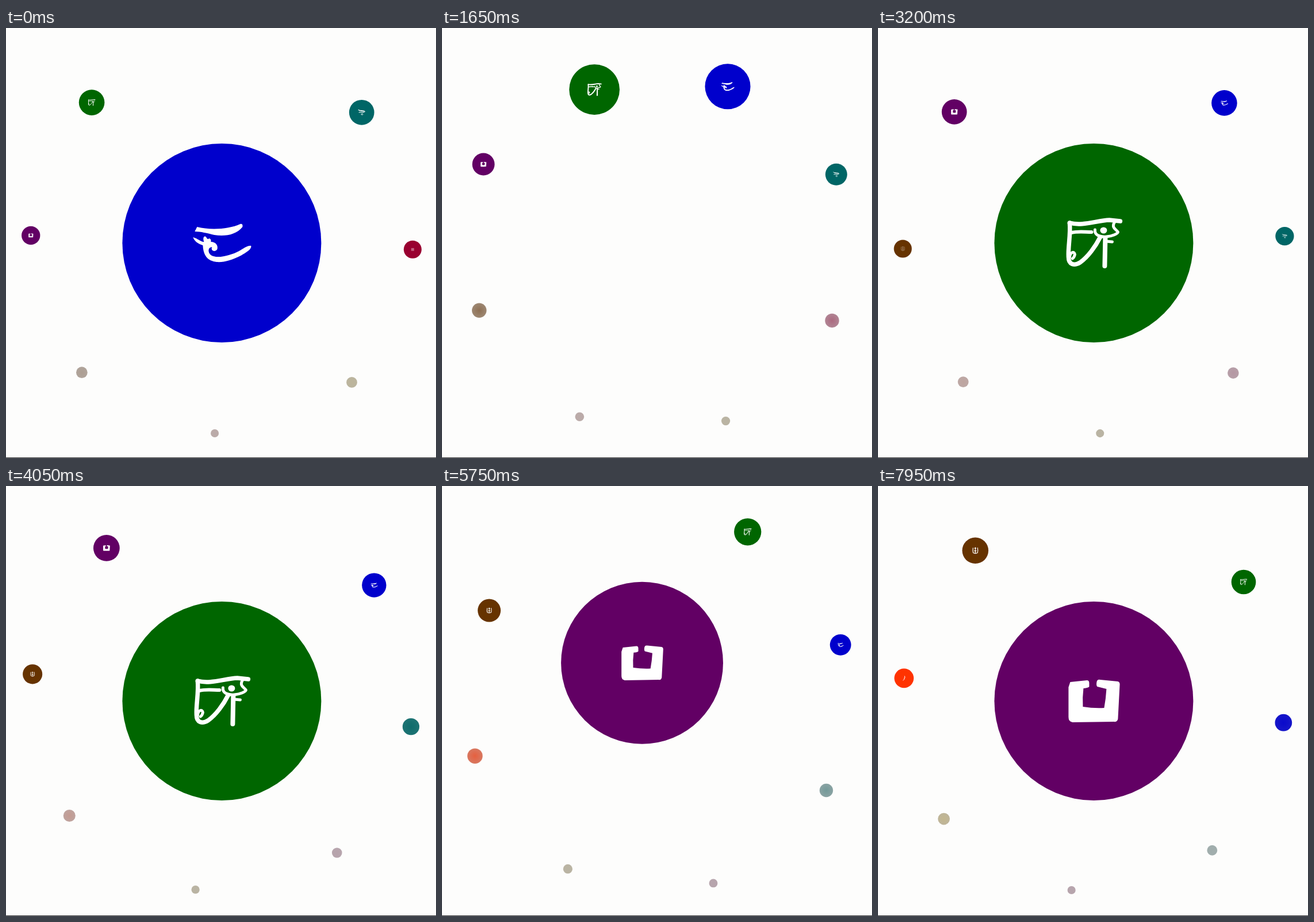
An HTML page with a canvas that plays this animation: 748 by 748 pixels, repeating every 8 s.

```html
<!DOCTYPE html>
<html lang="en">
<head>
<meta charset="utf-8">
<title>Glyph wheel</title>
<style>
  html, body { margin: 0; width: 100%; height: 100%; overflow: hidden; background: #fdfdfc; }
  canvas { display: block; }
</style>
</head>
<body>
<canvas id="stage" width="748" height="748"></canvas>
<script>
const ctx = document.getElementById('stage').getContext('2d');
const LOOP = 8000, STEP = 50;
const CENTER = { x: 375.3, y: 373 }, RING = 332.3;
const FOCUS = { x: 375.4, y: 374, r: 173 };
const FIRST_SWAP = 1527, SECOND_SWAP = 5267;
const ENTER_MS = 1000, LEAVE_MS = 200;

// Wheel rotation: [ms, degrees]
const TURN = [[0, 0], [1650, 22.05], [2400, 31.8], [4050, 50.8], [5150, 64.05], [6500, 79.65], [8000, 95.1]];
// Share of the faded colour: [y, amount]
const FADE = [[388, 0], [415, .11], [438, .26], [492, .62], [508, .72], [560, .88], [640, 1]];
const GLYPH_ALPHA = [[355, 1], [382, .45], [402, 0]];

// Glyph parts are [path, stroke width]; width 0 means filled. Drawn for a disc of radius 173 at (375, 374).
const GLYPHS = {
  reed: [
    ['M332 346C355 352 388 350 407 341Q412 340 411 346C400 360 380 363 362 360C350 357 338 354 328 354Z', 0],
    ['M325 364C333 366 340 373 344 372C341 364 345 360 348 364Q350 369 353 366Q357 367 356 372C365 372 369 379 367 385C363 391 355 387 358 381C351 381 350 390 356 395C366 402 390 396 405 388C414 383 420 378 426 379C427 385 418 390 408 396C392 404 378 408 366 407C350 405 343 396 342 378C335 376 327 371 325 364Z', 0]],
  eye: [
    ['M333 339C355 345 380 335 402 334L421 336', 7.5],
    ['M333 339C335 360 330 380 331 398C331 412 341 414 351 408C365 398 378 380 386 364', 7.5],
    ['M333 399C334 389 341 388 342 394Q341 399 338 401', 5],
    ['M336 356C348 353 360 355 371 355', 6],
    ['M377 351C376 361 387 364 397 363C408 362 416 358 417 355C414 350 405 348 411 338', 5],
    ['M386 352a6 5.5 0 1 0 12 0a6 5.5 0 1 0 -12 0Z', 0],
    ['M395 365L394 414', 8],
    ['M396 371L407 372', 5]],
  house: [
    ['M334 341L363 338Q367 338 367 343L367 349Q366 351 357 352Q355 368 356 384Q375 387 393 386Q396 370 397 353L381 349Q379 347 380 341Q381 336 386 337L417 340Q421 341 420 348L417 405Q416 411 410 410L376 410.5L338 411Q331 410 331 402L331 350Z', 0]],
  cart: [
    ['M330 338L350 352L420 362L398 374L338 374', 8],
    ['M345 345L410 352', 7],
    ['M371 400a10 10 0 1 0 20 0a10 10 0 1 0 -20 0Z', 6]],
  trident: [
    ['M345 340Q338 376 346 402Q375 420 405 402Q412 376 405 338', 9],
    ['M375 335L375 410M362 378L388 378M367 346L375 334L383 346', 9]],
  bolt: [['M386 338L392 366L372 376L386 386L358 412', 10]],
  block: [['M347 348H403V402H347Z', 0]]
};
for (const parts of Object.values(GLYPHS))
  for (const part of parts) part[0] = new Path2D(part[0]);

// angle is clockwise from the left; enter and leave bound the stay in the middle
const disc = (angle, color, faded, glyph, enter = Infinity, leave = Infinity) =>
  ({ angle, color, faded, glyph, enter, leave });
const DISCS = [
  disc(2.1, [98, 0, 100], [176, 166, 176], 'house', SECOND_SWAP),
  disc(47.1, [0, 102, 0], [168, 176, 168], 'eye', FIRST_SWAP, SECOND_SWAP),
  disc(92.1, [0, 0, 204], [168, 168, 180], 'reed', -ENTER_MS, FIRST_SWAP),
  disc(137.1, [0, 102, 102], [162, 174, 173], 'cart'),
  disc(182.1, [153, 0, 48], [183, 165, 173], 'block'),
  disc(227.1, [255, 204, 0], [186, 180, 163], 'block'),
  disc(272.1, [255, 51, 0], [187, 171, 169], 'bolt'),
  disc(317.1, [102, 51, 0], [179, 169, 161], 'trident')
];

const lerp = (a, b, p) => a + (b - a) * p;
const clamp = v => Math.min(1, Math.max(0, v));

function along(points, x) {
  if (x <= points[0][0]) return points[0][1];
  for (let i = 1; i < points.length; i++) {
    const [x0, y0] = points[i - 1], [x1, y1] = points[i];
    if (x <= x1) return lerp(y0, y1, (x - x0) / (x1 - x0));
  }
  return points[points.length - 1][1];
}

// Cubic bezier .25, .1, .25, 1
function ease(x) {
  if (x <= 0 || x >= 1) return clamp(x);
  let low = 0, high = 1, s;
  for (let i = 0; i < 24; i++) {
    s = (low + high) / 2;
    if (.75 * s * (1 - s) + s ** 3 < x) low = s; else high = s;
  }
  return .3 * s * (1 - s) ** 2 + 3 * s * s * (1 - s) + s ** 3;
}

function onRing(degrees) {
  const a = degrees * Math.PI / 180;
  const y = CENTER.y - RING * Math.sin(a);
  return { x: CENTER.x - RING * Math.cos(a), y, r: 15.85 + (CENTER.y - y) * .02656 };
}

const between = (a, b, p) => ({ x: lerp(a.x, b.x, p), y: lerp(a.y, b.y, p), r: lerp(a.r, b.r, p) });

function place(d, t) {
  const ring = onRing(d.angle + along(TURN, t));
  if (t < d.enter) return ring;
  if (t >= d.leave) return between(FOCUS, ring, ease((t - d.leave) / LEAVE_MS));
  const start = onRing(d.angle + along(TURN, d.enter));
  return between(start, FOCUS, ease((t - d.enter) / ENTER_MS));
}

const mix = (d, p) => `rgb(${d.color.map((c, i) => Math.round(lerp(c, d.faded[i], clamp(p))))})`;

function drawDisc(d, { x, y, r }) {
  const big = r > 30;
  const fade = big ? 0 : along(FADE, y);
  const spread = .4 * fade * (1 - fade);
  const fill = ctx.createRadialGradient(x, y, 0, x, y, r);
  fill.addColorStop(0, mix(d, fade - spread));
  fill.addColorStop(1, mix(d, fade + spread));
  ctx.fillStyle = fill;
  ctx.beginPath();
  ctx.arc(x, y, r, 0, 2 * Math.PI);
  ctx.fill();

  const alpha = big ? 1 : along(GLYPH_ALPHA, y);
  if (!alpha) return;
  ctx.save();
  ctx.globalAlpha = alpha;
  ctx.translate(x, y);
  ctx.scale(r / 173, r / 173);
  ctx.translate(-375, -374);
  ctx.fillStyle = ctx.strokeStyle = '#fff';
  ctx.lineCap = ctx.lineJoin = 'round';
  for (const [path, width] of GLYPHS[d.glyph]) {
    ctx.lineWidth = width;
    if (width) ctx.stroke(path); else ctx.fill(path);
  }
  ctx.restore();
}

function draw() {
  const t = Math.floor(performance.now() % LOOP / STEP) * STEP;
  ctx.fillStyle = '#fdfdfc';
  ctx.fillRect(0, 0, 748, 748);
  DISCS.map(d => [d, place(d, t)])
    .sort((a, b) => a[1].r - b[1].r)
    .forEach(([d, spot]) => drawDisc(d, spot));
  ctx.fillStyle = '#333';
  ctx.fillRect(0, 747, 748, 1);
  requestAnimationFrame(draw);
}
draw();
</script>
</body>
</html>
```
